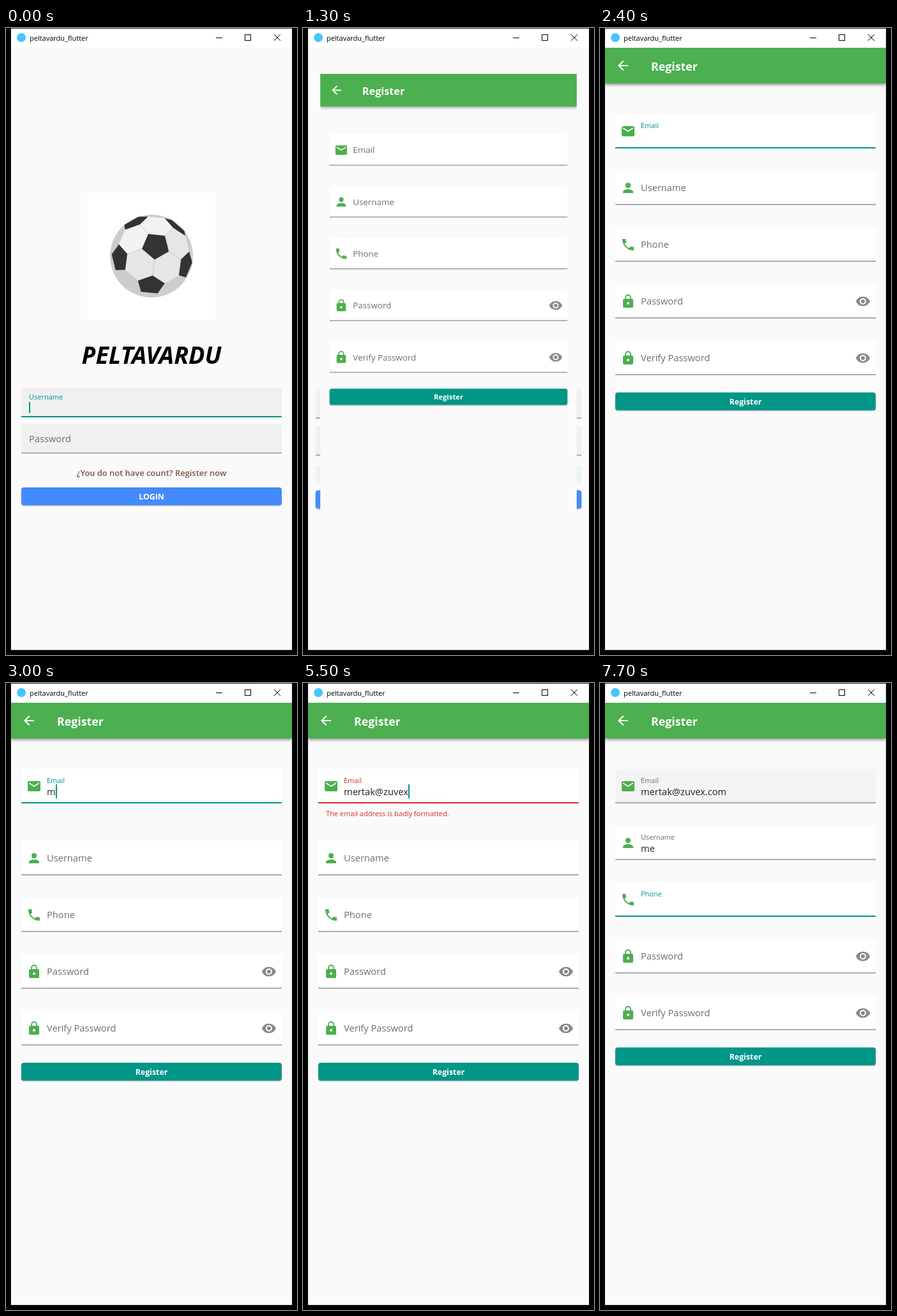
An HTML page with a canvas for the animation above (8000 ms loop, 456x984 px).

```html
<!DOCTYPE html>
<html lang="en">
<head>
<meta charset="utf-8">
<title>Sign-up flow</title>
<style>
  html, body { margin: 0; width: 100%; height: 100%; overflow: hidden; background: #000; }
  canvas { display: block; width: 100vw; height: 100vh; }
</style>
</head>
<body>
<canvas id="stage" width="456" height="984"></canvas>
<script>
const ctx = document.getElementById('stage').getContext('2d');
const LOOP = 8000, STEP = 100, BLINK = 480, ANIM = 200;
const PAGE = '#fafafa', GREEN = '#4caf50', DARK = '#333';
const TEAL = [0, 150, 136], RED = [211, 47, 47], LINE = [172, 172, 172], GREY = [110, 110, 110];

// Key presses: each burst types its letters at an even pace.
const burst = (str, start, gap) => [...str].map((ch, i) => ({ ch, at: start + i * gap }));
const emailKeys = [
  ...burst('mertak', 3000, 140), ...burst('@', 4200, 0),
  ...burst('zuvex', 4900, 150), ...burst('.com', 6100, 100)
];
const userKeys = burst('me', 6800, 200);
const TAP_LINK = 1000, OPEN_PAGE = 1250, TO_EMAIL = 1860, TO_USER = 6520, TO_PHONE = 7220;
const INVALID = 3000, VALID = 6200;

// ---- helpers ----
const clamp = v => Math.max(0, Math.min(1, v));
const lerp = (a, b, p) => a + (b - a) * p;
const mix = (a, b, p) => a.map((v, i) => lerp(v, b[i], p));
const rgb = c => `rgb(${c.map(Math.round)})`;
const ramp = (t, start) => {
  const p = clamp((t - start) / ANIM);
  return p * p * (3 - 2 * p);
};
const pulse = (t, from, until) => ramp(t, from) - ramp(t, until);

function rect(x, y, w, h, color) {
  ctx.fillStyle = color;
  ctx.fillRect(x, y, w, h);
}

function round(x, y, w, h, r, color) {
  ctx.fillStyle = color;
  ctx.beginPath();
  ctx.roundRect(x, y, w, h, r);
  ctx.fill();
}

function disc(x, y, r, color) {
  ctx.fillStyle = color;
  ctx.beginPath();
  ctx.arc(x, y, r, 0, Math.PI * 2);
  ctx.fill();
}

function trace(pts) {
  ctx.beginPath();
  pts.forEach(([x, y]) => ctx.lineTo(x, y));
}

function poly(color, pts) {
  ctx.fillStyle = color;
  trace(pts);
  ctx.closePath();
  ctx.fill();
}

function line(color, width, ...pts) {
  ctx.strokeStyle = color;
  ctx.lineWidth = width;
  trace(pts);
  ctx.stroke();
}

function shadowed(alpha, blur, dy, draw) {
  ctx.save();
  ctx.shadowColor = `rgba(0,0,0,${alpha})`;
  ctx.shadowBlur = blur;
  ctx.shadowOffsetY = dy;
  draw();
  ctx.restore();
}

// Draws text centred on the line cy; returns its width.
function text(str, x, cy, size, color, style = '400', align = 'left') {
  ctx.font = `${style} ${size * 0.917}px "Open Sans", "Noto Sans", sans-serif`;
  ctx.textAlign = align;
  ctx.fillStyle = color;
  ctx.fillText(str, x, cy + size * 0.33);
  return ctx.measureText(str).width;
}

// ---- icons on a 24 px grid ----
const HANDSET = new Path2D('M6.6 10.8c1.4 2.8 3.8 5.1 6.6 6.6l2.2-2.2c.3-.3.7-.4 1-.2 1.1.4 2.3.6 3.6.6.6 0 1 .4 1 1V20c0 .6-.4 1-1 1C10.6 21 3 13.4 3 4c0-.6.4-1 1-1h3.5c.6 0 1 .4 1 1 0 1.2.2 2.4.6 3.6.1.3 0 .7-.2 1z');
const BUST = new Path2D('M4 20v-2c0-2.7 5.3-4 8-4s8 1.3 8 4v2z');
const EYE = new Path2D('M1 12C2.7 7.6 7 4.5 12 4.5S21.3 7.6 23 12C21.3 16.4 17 19.5 12 19.5S2.7 16.4 1 12z');

const icons = {
  mail(bg) {
    round(2, 4, 20, 16, 2, GREEN);
    poly(bg, [[4, 6], [12, 11], [20, 6], [20, 8], [12, 13], [4, 8]]);
  },
  person() {
    disc(12, 8, 4, GREEN);
    ctx.fill(BUST);
  },
  phone() {
    ctx.fillStyle = GREEN;
    ctx.fill(HANDSET);
  },
  lock(bg) {
    round(4, 8, 16, 14, 2, GREEN);
    ctx.strokeStyle = GREEN;
    ctx.lineWidth = 1.9;
    ctx.beginPath();
    ctx.arc(12, 6, 4, Math.PI, 0);
    ctx.lineTo(16, 9);
    ctx.lineTo(8, 9);
    ctx.closePath();
    ctx.stroke();
    disc(12, 15, 2, bg);
  },
  eye(bg) {
    ctx.fillStyle = '#898989';
    ctx.fill(EYE);
    disc(12, 12, 5, bg);
    disc(12, 12, 3, '#898989');
  },
  back() {
    line('#fff', 2, [20, 12], [5, 12]);
    line('#fff', 2, [12.7, 4.7], [5.4, 12], [12.7, 19.3]);
  }
};

function icon(name, x, y, bg) {
  ctx.save();
  ctx.translate(x, y);
  icons[name](bg);
  ctx.restore();
}

// ---- football: a truncated icosahedron seen from the front ----
function tilt([x, y, z], a = 0.265, b = 0.112) {
  const y2 = y * Math.cos(a) - z * Math.sin(a);
  const z2 = y * Math.sin(a) + z * Math.cos(a);
  return [x * Math.cos(b) + z2 * Math.sin(b), y2, z2 * Math.cos(b) - x * Math.sin(b)];
}

const dot = (u, v) => u.reduce((sum, c, i) => sum + c * v[i], 0);
const pole = tilt([0, 0, 1]);
const ring = (turn, z) => Array.from({ length: 5 }, (_, k) => {
  const phi = (turn + 72 * k) * Math.PI / 180;
  return tilt([2 * z * Math.cos(phi), 2 * z * Math.sin(phi), z]);
});
const front = ring(24, Math.sqrt(0.2));
const back = front.map(v => v.map(c => -c));
const hubs = [pole, ...front, ...back, pole.map(c => -c)];

// Projects the point a third of the way from hub u to hub v.
function corner(u, v) {
  const p = mix(u, v, 1 / 3);
  const len = p[2] > 0 ? Math.hypot(...p) : Math.hypot(p[0], p[1]);
  return [228 + 65 * p[0] / len, 358 + 65 * p[1] / len];
}

function pentagon(hub) {
  const [hx, hy] = corner(hub, hub);
  const angle = ([x, y]) => Math.atan2(y - hy, x - hx);
  return hubs.filter(v => dot(hub, v) > 0.4 && dot(hub, v) < 0.9)
    .map(v => corner(hub, v))
    .sort((p, q) => angle(p) - angle(q));
}

function ball() {
  rect(128, 258, 200, 200, '#fff');
  disc(228, 358, 65, '#cdcdcd');
  front.forEach((a, k) => {
    const b = front[(k + 1) % 5];
    const lit = a[0] + a[1] + b[0] + b[1] < -0.8;
    const hex = [[pole, a], [a, pole], [a, b], [b, a], [b, pole], [pole, b]];
    poly(lit ? '#f1f2f2' : '#e6e6e6', hex.map(([u, v]) => corner(u, v)));
  });
  front.forEach(v => line('#cacaca', 1, corner(pole, v), corner(v, pole)));
  [pole, ...front].forEach(hub => poly(DARK, pentagon(hub)));
}

// ---- form parts ----
function field(t, f) {
  const { y, h, x, label, fill, keys = [], error = 0, from = Infinity, until = Infinity } = f;
  const done = keys.filter(k => k.at <= t);
  const value = done.map(k => k.ch).join('');
  const focus = pulse(t, from, until);
  const lift = value ? 1 : focus;
  const tone = base => rgb(mix(mix(base, TEAL, focus), RED, error));

  round(24, y, 408, h, [4, 4, 0, 0], fill);
  rect(24, y + h - 2, 408, 2, tone(LINE));
  if (f.icon) icon(f.icon, 32, y + 15, fill);
  if (f.secret) icon('eye', 400, y + 15, fill);
  text(label, x, lerp(y + h / 2, f.up, lift), lerp(16, 12, lift), tone(GREY));
  const end = x + (value ? text(value, x, y + 36, 16, '#222') : 0);

  // The caret restarts its blink at every key press.
  const last = done.length ? done[done.length - 1].at : from;
  if (t >= from && t < until && (t - last) % (2 * BLINK) < BLINK) {
    if (value) rect(Math.round(end), y + 24, 2, 22, rgb(TEAL));
    else rect(x, y + h / 2 - 1, 2, 17, rgb(TEAL));
  }
}

function button(label, y, color) {
  shadowed(0.3, 2, 1, () => round(24, y, 408, 28, 4, color));
  text(label, 228, y + 14.5, 13.5, '#fff', '700', 'center');
}

// ---- pages ----
function login(t) {
  rect(8, 31, 440, 945, PAGE);
  ball();
  text('PELTAVARDU', 228, 513.5, 41, '#000', 'italic 700', 'center');

  const base = { x: 36, h: 46, fill: '#f0f0f0' };
  field(t, { ...base, y: 565, up: 579, label: 'Username', from: -400, until: TAP_LINK + 60 });
  field(t, { ...base, y: 622, up: 636, label: 'Password' });

  if (t >= TAP_LINK) {
    ctx.save();
    ctx.beginPath();
    ctx.roundRect(24, 683, 408, 28, 4);
    ctx.clip();
    rect(24, 683, 408, 28, 'rgba(0,150,136,.06)');
    disc(190, 697, (t - TAP_LINK) * 0.36, 'rgba(0,150,136,.05)');
    ctx.restore();
  }
  text('¿You do not have count? Register now', 228, 698, 14.1, '#795548', '600', 'center');
  button('LOGIN', 721, '#448aff');
}

function register(t) {
  const shift = t >= INVALID && t < VALID + ANIM ? 24 : 0;
  const error = pulse(t, INVALID, VALID);
  const rows = [
    { label: 'Email', icon: 'mail', keys: emailKeys, from: TO_EMAIL, until: TO_USER,
      error, hover: t >= TO_USER },
    { label: 'Username', icon: 'person', keys: userKeys, from: TO_USER, until: TO_PHONE },
    { label: 'Phone', icon: 'phone', from: TO_PHONE },
    { label: 'Password', icon: 'lock', secret: true, hover: t >= 1500 && t < 1700 },
    { label: 'Verify Password', icon: 'lock', secret: true }
  ];

  rect(8, 31, 440, 945, PAGE);
  shadowed(0.45, 5, 2, () => rect(8, 31, 440, 56, GREEN));
  icon('back', 24, 47);
  text('Register', 80, 61, 19.4, '#fff', '700');

  rows.forEach((row, i) => {
    const y = 135 + 89 * i + (i ? shift : 0);
    field(t, { ...row, x: 64, y, h: 54, up: y + 18, fill: row.hover ? '#f4f4f4' : '#fff' });
  });
  if (error > 0) {
    ctx.globalAlpha = error;
    text('The email address is badly formatted.', 36, 205, 12, rgb(RED));
    ctx.globalAlpha = 1;
  }
  button('Register', 572 + shift, rgb(TEAL));
}

function zoomed(scale, page, t) {
  ctx.save();
  ctx.translate(228, 503.5);
  ctx.scale(scale, scale);
  ctx.translate(-228, -503.5);
  ctx.beginPath();
  ctx.rect(8, 31, 440, 945);
  ctx.clip();
  page(t);
  ctx.restore();
}

function frame() {
  rect(0, 0, 456, 984, '#000');
  rect(7, 0, 442, 977, '#262626');
  rect(8, 1, 440, 30, '#fff');
  disc(24, 15, 7, '#47c5fb');
  text('peltavardu_flutter', 37, 16, 12, '#000');
  rect(329, 15, 10, 1, '#000');
  ctx.strokeStyle = '#000';
  ctx.lineWidth = 1;
  ctx.strokeRect(374.5, 10.5, 9, 9);
  line('#000', 1, [420, 10], [430, 20]);
  line('#000', 1, [430, 10], [420, 20]);
}

function render(t) {
  frame();
  ctx.save();
  ctx.beginPath();
  ctx.rect(8, 31, 440, 945);
  ctx.clip();
  const p = clamp((t - OPEN_PAGE) / 300);
  const ease = 1 - (1 - p) ** 3;
  if (p < 1) {
    zoomed(1 + 0.05 * ease, login, t);
    rect(8, 31, 440, 945, `rgba(0,0,0,${0.6 * clamp(5 * p - 1)})`);
  }
  if (p > 0) zoomed(0.85 + 0.15 * ease, register, t);
  ctx.restore();
}

const start = performance.now();
function tick() {
  const t = (performance.now() - start) % LOOP;
  render(Math.floor(t / STEP) * STEP);
  requestAnimationFrame(tick);
}
tick();
</script>
</body>
</html>
```
